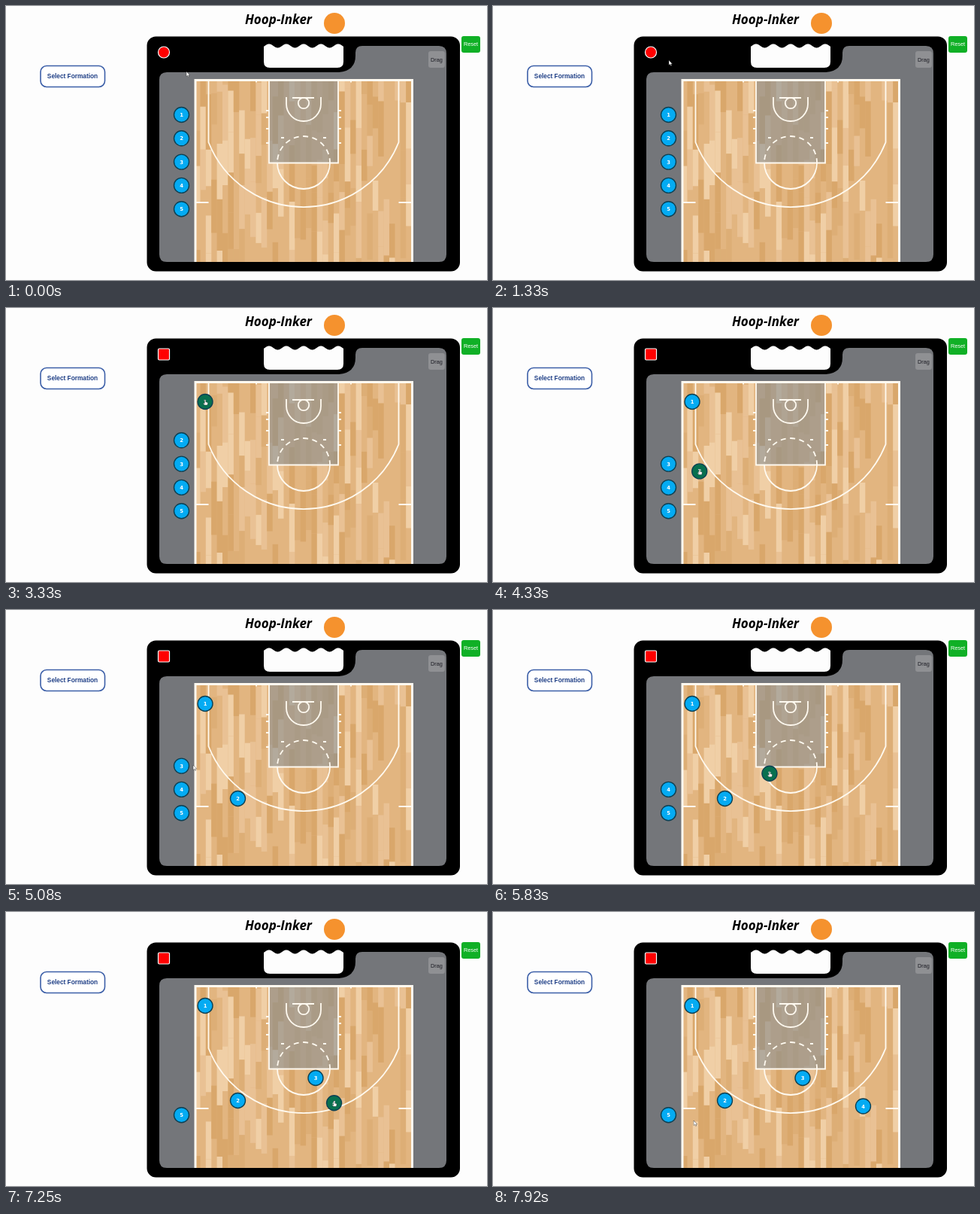
Recreate the animation shown at these times as an HTML page. Size 640 by 364 pixels, loop 8 s.

```html
<!DOCTYPE html>
<html lang="en">
<head>
<meta charset="utf-8">
<title>Court board</title>
<style>
  html, body { margin: 0; width: 100%; height: 100%; overflow: hidden; background: #fdfdfd; }
  svg { display: block; width: 100vw; height: 100vh; }
  text { font-family: "Liberation Sans", Arial, sans-serif; text-anchor: middle; }
  .title { font: italic 700 17px "Open Sans", sans-serif; }
  .lines { fill: none; stroke: #fffaf0; stroke-width: 1.8; }
  .token text { font: 700 6.8px "DejaVu Sans", sans-serif; fill: #fff; }
</style>
</head>
<body>
<svg viewBox="0 0 640 364">
  <defs>
    <clipPath id="floor"><rect x="251" y="98" width="290" height="242"/></clipPath>
    <filter id="blur" x="-50%" y="-50%" width="200%" height="200%"><feGaussianBlur stdDeviation="1.6"/></filter>
  </defs>

  <text class="title" x="362.5" y="24">Hoop-Inker</text>
  <circle cx="437" cy="23" r="14" fill="#f5922e"/>

  <rect x="46" y="79.5" width="85.5" height="28" rx="8" fill="#fff" stroke="#3c5fa8" stroke-width="1.6"/>
  <text x="88.5" y="96" font-size="8.3" font-weight="700" fill="#1f3f86">Select Formation</text>

  <rect x="187.5" y="40.5" width="416.5" height="312" rx="12"/>
  <path fill="#74767a" d="M214 88H443Q465 86 465 66V62Q465 53 474 53H576Q586 53 586 63V330Q586 340 576 340H214Q204 340 204 330V98Q204 88 214 88Z"/>
  <path id="grip" fill="#fdfdfd"/>

  <rect x="562" y="60" width="22" height="22" rx="3" fill="#8f9093"/>
  <text x="573" y="73.5" font-size="7.3" fill="#1c1c24">Drag</text>
  <rect x="606" y="40" width="25" height="22" rx="3" fill="#10b026"/>
  <text x="618.5" y="53" font-size="7.3" fill="#fff">Reset</text>

  <g clip-path="url(#floor)">
    <rect x="251" y="98" width="290" height="242" fill="#e2b580"/>
    <g id="planks"></g>
    <rect x="350" y="98" width="92" height="110" fill="#828c94" fill-opacity=".55"/>
  </g>
  <g class="lines">
    <path stroke-width="3" d="M252 340V98.5H540.5V340"/>
    <path d="M350 98V208.5H442V98M381 122H410M373 121V130A23 23 0 0 0 419 130V121"/>
    <circle cx="396" cy="129" r="7.2"/>
    <path d="M361 208A35 35 0 0 0 431 208"/>
    <path d="M361 208A35 35 0 0 1 431 208" stroke-dasharray="7 5.5" stroke-dashoffset="-4"/>
    <path d="M269.5 98V181A136 136 0 0 0 522.5 181V98"/>
    <path id="ticks"/>
  </g>

  <rect id="glow" x="200" y="52" width="20" height="20" rx="6" fill="#f0eadc" filter="url(#blur)"/>
  <rect id="record" x="202.5" y="54" width="15" height="15" fill="#f00" stroke="#fff" stroke-width="1.2"/>
  <g id="tokens"></g>
  <g id="cursor" fill="#fff" stroke="#222" stroke-width=".4">
    <path id="arrow" d="M0 0V6.5L1.6 5.2L2.7 7.5L3.7 7L2.7 4.9H4.6Z"/>
    <path id="hand" d="M-.8 4.5L-2.6 2.6L-1.8 1.9L-.7 2.7V-2.4Q0 -3.2 .6 -2.4V.2L3 .9Q3.7 1.2 3.5 2.2L2.9 4.5Z"/>
  </g>
</svg>
<script>
const LOOP = 8000, STEP = 1000 / 12, RECORD_AT = 2080;
const FIRST_GRAB = 2560, TURN = 1400, DRAG = 700, HOLD = 80;
const $ = id => document.getElementById(id);

// Wavy top edge of the handle
let grip = '';
for (let x = 343; x <= 449; x++) {
  grip += `${grip ? 'L' : 'M'}${x} ${53 - 2.5 * Math.cos((x - 396) / 23 * 2 * Math.PI)}`;
}
$('grip').setAttribute('d', grip + 'V74Q449 82 441 82H351Q343 82 343 74Z');

// Short court marks, mirrored about the middle
let marks = '';
for (const side of [-1, 1]) {
  const dash = (dx, y, length) => marks += `M${396 + side * dx} ${y}h${side * length}`;
  for (const y of [139, 148, 163, 182]) dash(46, y, 4);
  dash(26, 175, 4);
  dash(126.5, 261, 17);
  marks += `M${396 + side * 63} 98v3.5`;
}
$('ticks').setAttribute('d', marks);

// Wooden floor
let seed = 29;
const rand = () => (seed = (seed * 16807) % 2147483647) / 2147483647;
const woods = ['#d9a76b', '#e9c194', '#f0cfa6', '#ddae76'];
let planks = '';
for (let x = 251; x < 541; x += 7.4) {
  let y = 98 - rand() * 50;
  while (y < 340) {
    const h = 35 + rand() * 40, wood = woods[Math.floor(rand() * 7)];
    if (wood) planks += `<rect x="${x}" y="${y}" width="7.5" height="${h}" fill="${wood}"/>`;
    y += h;
  }
}
$('planks').innerHTML = planks;

// Where each player is dropped, and a point the pointer passes on its way back
const plays = [
  { spot: [265, 124.5] },
  { spot: [308.5, 250.5], pass: [5080, 249, 206] },
  { spot: [412, 220.5], pass: [6670, 238, 227] },
  { spot: [492.5, 258], pass: [7920, 267, 277] }
];
const home = i => [233.5, 144.5 + i * 31.3];
const grabAt = i => FIRST_GRAB + i * TURN;

const tokens = Array.from({ length: 5 }, (_, i) => {
  const g = document.createElementNS('http://www.w3.org/2000/svg', 'g');
  g.setAttribute('class', 'token');
  g.innerHTML = `<circle r="10" stroke="#0c4053" stroke-width="1.4"/><text y="2.5">${i + 1}</text>`;
  $('tokens').append(g);
  return g;
});

// Pointer stops: time, x, y
const stops = [[0, 240, 87], [1330, 234, 72], [1920, 213, 62], [2230, 213, 62]];
plays.forEach(({ spot, pass }, i) => {
  const grab = grabAt(i), drop = grab + DRAG;
  stops.push([grab - 60, ...home(i)], [grab, ...home(i)], [drop, ...spot], [drop + HOLD, ...spot]);
  if (pass) stops.push(pass);
});
stops.push([LOOP + 60, ...home(4)]);

function pointer(t) {
  const i = Math.max(1, stops.findIndex(s => s[0] >= t));
  const [t0, x0, y0] = stops[i - 1], [t1, x1, y1] = stops[i];
  const p = (t - t0) / (t1 - t0), e = p * p * (3 - 2 * p);
  return [x0 + (x1 - x0) * e, y0 + (y1 - y0) * e];
}

function place(i, t, mouse) {
  if (!plays[i] || t < grabAt(i)) return home(i);
  return t < grabAt(i) + DRAG ? mouse : plays[i].spot;
}

const show = (id, on) => $(id).setAttribute('visibility', on ? 'visible' : 'hidden');
const move = (el, [x, y]) => el.setAttribute('transform', `translate(${x} ${y})`);

function draw(time) {
  const t = Math.floor((time % LOOP + 5) / STEP) * STEP % LOOP;
  const mouse = pointer(t);
  const near = ([x, y], r) => Math.hypot(mouse[0] - x, mouse[1] - y) < r;
  const onRecord = near([210, 61.5], 8);
  let hand = onRecord;

  tokens.forEach((g, i) => {
    const at = place(i, t, mouse), over = near(at, 10);
    hand = hand || over;
    move(g, at);
    g.firstChild.setAttribute('fill', over ? '#08704f' : '#04abf3');
  });

  show('glow', onRecord);
  $('record').setAttribute('rx', t < RECORD_AT ? 7.5 : 1.5);
  move($('cursor'), mouse);
  show('arrow', !hand);
  show('hand', hand);
}

const start = performance.now();
function tick() {
  draw(performance.now() - start);
  requestAnimationFrame(tick);
}
tick();
</script>
</body>
</html>
```
